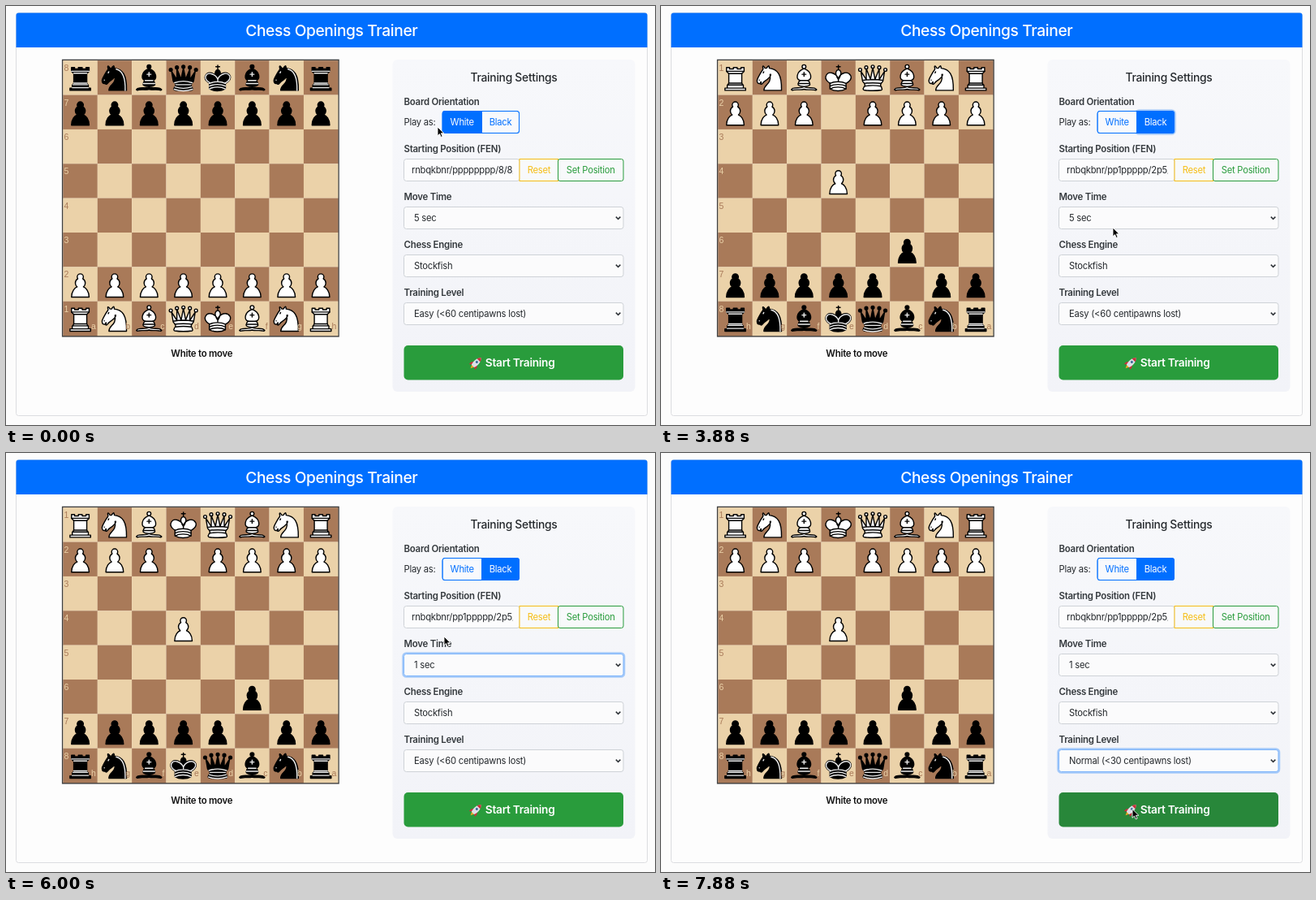
An HTML page for the animation above (8000 ms loop, 800 by 516 pixels).

```html
<!DOCTYPE html>
<html lang="en">
<head>
<meta charset="utf-8">
<title>Chess Openings Trainer</title>
<style>
  html, body { margin: 0; width: 100%; height: 100%; overflow: hidden; background: #fcfcfc; }
  svg { display: block; width: 800px; height: 516px; }
  text { font-family: Inter, Roboto, sans-serif; font-size: 11.2px; letter-spacing: -.02em; white-space: pre; }
  .label { font-size: 11.4px; font-weight: 600; }
  .coord { font-family: "Liberation Sans", Arial, sans-serif; font-size: 10.5px; letter-spacing: 0; }
</style>
</head>
<body>
<svg viewBox="0 0 800 516">
  <defs>
    <linearGradient id="panel" x2="0" y2="1"><stop stop-color="#f7f8fb"/><stop offset="1" stop-color="#f2f3f8"/></linearGradient>
    <linearGradient id="menu" x2="0" y2="1"><stop stop-color="#4c4d4e"/><stop offset=".5" stop-color="#565656"/><stop offset="1" stop-color="#4b4b4b"/></linearGradient>
    <clipPath id="fenClip"><rect x="499" y="189" width="125.5" height="26"/></clipPath>
  </defs>
  <g id="stage"></g>
</svg>
<script>
const LOOP = 8000, STEP = 125;
const BLUE = '#006fff', GREEN = '#299c3c', YELLOW = '#f5bd14', INK = '#24282c';
const LIGHT = '#ebd2a9', DARK = '#a97a59';
const BOARD = { x: 70.4, y: 67.2, cell: 42.36 };

// Piece outlines on a 45 x 45 grid: body, detail lines, and details for the black set.
const PIECES = {
  p: { body: 'M22.5 9c-2.21 0-4 1.79-4 4 0 .89.29 1.71.78 2.38C17.33 16.5 16 18.59 16 21c0 2.03.94 3.84 2.41 5.03-3 1.06-7.41 5.55-7.41 13.47h23c0-7.92-4.41-12.41-7.41-13.47 1.47-1.19 2.41-3 2.41-5.03 0-2.41-1.33-4.5-3.28-5.62.49-.67.78-1.49.78-2.38 0-2.21-1.79-4-4-4z', lines: '' },
  r: { body: 'M9 39h27v-3H9zM12 36v-4h21v4zM11 14V9h4v2h5V9h5v2h5V9h4v5l-3 3v12.5l1.5 2.5h-20l1.5-2.5V17z',
       lines: 'M11 14h23M14 17h17M14 29.5h17', dark: 'M12 35.5h21M13 31.5h19M14 29.5h17M14 16.5h17M11 14h23' },
  n: { body: 'M22 10c10.5 1 16.5 8 16 29H15c0-9 10-6.5 8-21M24 18c.38 2.91-5.55 7.37-8 9-3 2-2.82 4.34-5 4-1.04-.94 1.41-3.04 0-3-1 0 .19 1.23-1 2-1 0-4 1-4-4 0-2 6-12 6-12s1.89-1.9 2-3.5c-.73-1-.5-2-.5-3 1-1 3 2.5 3 2.5h2s.78-2 2.5-3c1 0 1 3 1 3',
       lines: 'M9 25.4v.2M14.8 14.6l-.7 1.5', dark: 'M9 25.4v.2M14.8 14.6l-.7 1.5M24.5 11.2c8 1.8 12.3 9.8 11.8 28' },
  b: { body: 'M9 36c3.39-.97 10.11.43 13.5-2 3.39 2.43 10.11 1.03 13.5 2 0 0 1.65.54 3 2-.68.97-1.65.99-3 .5-3.39-.97-10.11.46-13.5-1-3.39 1.46-10.11.03-13.5 1-1.35.49-2.32.47-3-.5 1.35-1.94 3-2 3-2zM15 32c2.5 2.5 12.5 2.5 15 0 .5-1.5 0-2 0-2 0-2.5-2.5-4-2.5-4 5.5-1.5 6-11.5-5-15.5-11 4-10.5 14-5 15.5 0 0-2.5 1.5-2.5 4 0 0-.5.5 0 2zM25 8a2.5 2.5 0 1 1-5 0 2.5 2.5 0 1 1 5 0z',
       lines: 'M17.5 26h10M15 30h15m-7.5-14.5v5M20 18h5' },
  q: { body: [[6, 12], [14, 9], [22.5, 8], [31, 9], [39, 12]].map(([x, y]) => `M${x - 2} ${y}a2 2 0 1 1 4 0a2 2 0 1 1-4 0z`).join('') +
         'M9 26c8.5-1.5 21-1.5 27 0l2-12-7 11V11l-5.5 13.5-3-15-3 15-5.5-14V25L7 14zM9 26c0 2 1.5 2 2.5 4 1 1.5 1 1 .5 3.5-1.5 1-1.5 2.5-1.5 2.5-1.5 1.5.5 2.5.5 2.5 6.5 1 16.5 1 23 0 0 0 1.5-1 0-2.5 0 0 .5-1.5-1-2.5-.5-2.5-.5-2 .5-3.5 1-2 2.5-2 2.5-4-8.5-1.5-18.5-1.5-27 0z',
       lines: 'M11.5 30c3.5-1 18.5-1 22 0M12 33.5c6-1 15-1 21 0',
       dark: 'M11 29a35 35 0 0 1 23 0M12.5 31.5h20M11.5 34.5a35 35 0 0 0 22 0M10.5 37.5a35 35 0 0 0 24 0' },
  k: { body: 'M22.5 11.63V6M20 8h5M22.5 25s4.5-7.5 3-10.5c0 0-1-2.5-3-2.5s-3 2.5-3 2.5c-1.5 3 3 10.5 3 10.5M11.5 37c5.5 3.5 15.5 3.5 21 0v-7s9-4.5 6-10.5c-4-6.5-13.5-3.5-16 4V27v-3.5c-3.5-7.5-13-10.5-16-4-3 6 5 10 5 10z',
       lines: 'M11.5 30c5.5-3 15.5-3 21 0M11.5 33.5c5.5-3 15.5-3 21 0M11.5 37c5.5-3 15.5-3 21 0',
       dark: 'M32 29.5s8.5-4 6-9.65C34.15 14 25 18 22.5 24.5v2.1-2.1C20 18 9.9 14 7 19.85c-2.5 5.65 4.85 9 4.85 9M11.5 30c5.5-3 15.5-3 21 0M11.5 33.5c5.5-3 15.5-3 21 0M11.5 37c5.5-3 15.5-3 21 0' },
};

// Pointer stops: time, x, y
const POINTER = [
  [0, 532, 149], [375, 606, 146], [500, 606, 146], [1000, 239, 288], [1500, 218, 133], [1625, 218, 133],
  [2250, 230.5, 197.5], [2375, 222, 211], [2875, 303, 344], [3000, 303, 344], [3250, 303, 304],
  [3875, 557, 273], [4250, 548, 263], [4875, 546, 262], [5375, 543, 237.5], [5750, 540, 226],
  [6000, 540, 226], [6500, 559.5, 332], [6750, 562, 379], [6875, 562, 379], [7250, 566, 398],
  [7375, 566, 398], [7875, 581, 438.5], [8000, 581, 439],
];
const FLIP = 500, TIME_MENU = [4375, 6000], LEVEL_MENU = [6875, 7375];
const MOVES = [
  { from: 'e2', to: 'e4', lift: 1625, drop: 2375 },
  { from: 'c7', to: 'c6', lift: 3000, drop: 3250 },
];
const TIMES = ['Instant response', '1 sec', '3 sec', '5 sec', '10 sec', '15 sec', '30 sec', '1 minute'];
const LEVELS = ['Easy (&lt;60 centipawns lost)', 'Normal (&lt;30 centipawns lost)', 'Hard (&lt;10 centipawns lost)'];

const during = (t, [a, b]) => t >= a && t < b;

function pointerAt(t) {
  const i = Math.max(1, POINTER.findIndex(p => p[0] > t));
  const [t0, x0, y0] = POINTER[i - 1], [t1, x1, y1] = POINTER[i];
  const u = (t - t0) / (t1 - t0), e = u * u * (3 - 2 * u);
  return { x: x0 + (x1 - x0) * e, y: y0 + (y1 - y0) * e };
}

const rect = (x, y, w, h, fill, extra = '') => `<rect x="${x}" y="${y}" width="${w}" height="${h}" fill="${fill}" ${extra}/>`;
// Text is placed by the middle of its line.
const text = (x, y, s, fill = INK, extra = '') => `<text x="${x}" y="${y + 4}" fill="${fill}" ${extra}>${s}</text>`;
const centred = (x, y, s, fill, extra = '') => text(x, y, s, fill, `text-anchor="middle" ${extra}`);
const label = (y, s) => text(490.5, y, s, '#33383c', 'class="label"');

function piece(code, x, y) {
  const white = code < 'a', { body, lines, dark = lines } = PIECES[code.toLowerCase()];
  return `<g transform="translate(${x} ${y}) scale(${BOARD.cell / 45})" stroke-width="1.5" stroke-linecap="round" stroke-linejoin="round">
    <path d="${body}" fill="${white ? '#fff' : '#000'}" stroke="#000"/>
    <path d="${white ? lines : dark}" fill="none" stroke="${white ? '#000' : '#ececec'}"/></g>`;
}

function startPosition() {
  const squares = {};
  [...'rnbqkbnr'].forEach((c, i) => {
    const file = 'abcdefgh'[i];
    Object.assign(squares, { [file + 8]: c, [file + 7]: 'p', [file + 2]: 'P', [file + 1]: c.toUpperCase() });
  });
  return squares;
}

function board(t, mouse) {
  const { x: bx, y: by, cell } = BOARD, flipped = t >= FLIP;
  const name = (c, r) => 'abcdefgh'[flipped ? 7 - c : c] + (flipped ? r + 1 : 8 - r);
  const squares = startPosition();
  MOVES.filter(m => t >= m.drop).forEach(m => {
    squares[m.to] = squares[m.from];
    delete squares[m.from];
  });
  const drag = MOVES.find(m => during(t, [m.lift, m.drop]));
  const over = name(Math.floor((mouse.x - bx) / cell), Math.floor((mouse.y - by) / cell));
  let cells = '', marks = '', men = '', notes = '';
  for (let r = 0; r < 8; r++) for (let c = 0; c < 8; c++) {
    const x = bx + c * cell, y = by + r * cell, sq = name(c, r), odd = (r + c) % 2;
    const ink = odd ? LIGHT : DARK;
    cells += rect(x, y, cell + .1, cell + .1, odd ? DARK : LIGHT);
    if (drag && (sq === drag.from || sq === over))
      marks += rect(x + 1.4, y + 1.4, cell - 2.8, cell - 2.8, 'none', 'stroke="#fbe82c" stroke-width="2.8"');
    if (squares[sq] && !(drag && sq === drag.from)) men += piece(squares[sq], x, y);
    if (c === 0) notes += text(x + 1.2, y + 9, sq[1], ink, 'class="coord"');
    if (r === 7) notes += text(x + cell - 2, y + 30.5, sq[0], ink, 'class="coord" text-anchor="end"');
  }
  const held = drag ? piece(squares[drag.from], mouse.x - cell / 2, mouse.y - cell / 2) : '';
  const turn = during(t, [MOVES[0].drop, MOVES[1].drop]) ? 'Black' : 'White';
  return rect(bx - .7, by - .7, cell * 8 + 1.4, cell * 8 + 1.4, 'none', 'stroke="#404040" stroke-width="1.6"') +
    cells + marks + men + notes + centred(241.3, 427.5, turn + ' to move', '#111', 'class="label"') + held;
}

const ring = (x, y, w, h) => rect(x - 1, y - 1, w + 2, h + 2, 'none', 'rx="4" stroke="#8dbcfa" stroke-opacity=".75" stroke-width="2.6"');

function select(y, value, focused) {
  return (focused ? ring(490.5, y - 13.5, 270.5, 27) : '') +
    rect(490.5, y - 13.5, 270.5, 27, '#fbfbfc', `rx="3" stroke="${focused ? '#7db4fb' : '#ced2d7'}"`) +
    text(503, y, value) +
    `<path d="M751.8 ${y - 1.4}l2.8 2.8 2.8-2.8" fill="none" stroke="#30343a" stroke-width="1.5"/>`;
}

function menu(y, options, chosen, mouse) {
  const pitch = 18.68, top = y - chosen * pitch - 14;
  const hover = Math.floor((mouse.y - top - 4.7) / pitch);
  let out = rect(484.5, top, 272, options.length * pitch + 8.6, 'url(#menu)', 'rx="5" stroke="#333" stroke-width=".8" style="filter:drop-shadow(0 2px 3px #0004)"');
  options.forEach((s, i) => {
    const cy = top + 14 + i * pitch;
    if (i === hover) out += rect(488, cy - 9.3, 265, 18.6, '#477ce6', 'rx="3"');
    if (i === chosen) out += `<path d="M492 ${cy + .5}l2 2.6 3.8-6" fill="none" stroke="#f2f2f2" stroke-width="1.3"/>`;
    out += text(501.3, cy, s, '#f2f2f2', 'style="font-size:11.4px"');
  });
  return out;
}

const rocket = `<g transform="translate(579.3 439.5) rotate(45)">
  <path d="M-2 5L0 9.5 2 5z" fill="#f6a623"/>
  <path d="M-2.5 0L-5 3.5V7l3-2h4l3 2V3.5L2.5 0z" fill="#c9303c"/>
  <path d="M0-9C4-5 4 1 2.2 5.5h-4.4C-4 1-4-5 0-9z" fill="#dbe1e8"/>
  <path d="M0-9C1.6-7.4 2.4-6 2.8-4.5h-5.6C-2.4-6-1.6-7.4 0-9z" fill="#c9303c"/>
  <circle cy="-1.5" r="1.5" fill="#3c6b96"/></g>`;

function settings(t, mouse) {
  const black = t >= FLIP, fenMoved = t >= MOVES[1].drop;
  const fen = fenMoved ? 'rnbqkbnr/pp1ppppp/2p5/8/4P3/8' : 'rnbqkbnr/pppppppp/8/8/8/8';
  const hot = mouse.y > 418 && mouse.x > 491;
  const choice = (x, w, s, on) => rect(x, 129.5, w, 27, on ? BLUE : '#f8f9fc', `stroke="${BLUE}"`) +
    centred(x + w / 2, 143, s, on ? '#fff' : BLUE);
  return rect(476.5, 66, 299, 409, 'url(#panel)', 'rx="6"') +
    centred(626, 88.8, 'Training Settings', INK, 'style="font-size:13.85px;font-weight:500"') +
    label(117.5, 'Board Orientation') + text(490.5, 143, 'Play as:') +
    (black && t < TIME_MENU[0] ? ring(586, 129.5, 46.5, 27) : '') +
    `<clipPath id="pair">${rect(537.5, 129, 95.5, 28, '#000', 'rx="3.5"')}</clipPath><g clip-path="url(#pair)">` +
    choice(538, 48.5, 'White', !black) + choice(586.5, 46, 'Black', black) + '</g>' +
    rect(538, 129.5, 94.5, 27, 'none', `rx="3" stroke="${BLUE}"`) +
    label(176.3, 'Starting Position (FEN)') +
    rect(490.5, 188.5, 142.5, 27, '#fcfcfd', 'rx="3" stroke="#ced2d7"') +
    `<g clip-path="url(#fenClip)">${text(500, 202, fen)}</g>` +
    rect(633, 188.5, 47.5, 27, '#f8f9fb', `stroke="${YELLOW}"`) + centred(657, 202, 'Reset', YELLOW) +
    rect(680.5, 188.5, 80.5, 27, '#f8f9fb', `rx="2.5" stroke="${GREEN}"`) + centred(720.7, 202, 'Set Position', GREEN) +
    label(235.3, 'Move Time') + select(261, t < TIME_MENU[1] ? '5 sec' : '1 sec', during(t, [TIME_MENU[0], LEVEL_MENU[0]])) +
    label(294.2, 'Chess Engine') + select(320, 'Stockfish', false) +
    label(353, 'Training Level') + select(379, LEVELS[t < LEVEL_MENU[1] ? 0 : 1], t >= LEVEL_MENU[0]) +
    rect(490.5, 418, 270.5, 42.5, hot ? '#28873a' : GREEN, 'rx="5"') + rocket +
    text(590.8, 439.8, 'Start Training', '#fff', 'style="font-size:13.7px;font-weight:600"');
}

function scene(t) {
  const mouse = pointerAt(t);
  return rect(12.5, 8.5, 778, 496, '#fdfdfd', 'rx="3" stroke="#dcdde0"') +
    `<path d="M12.5 51V11.5q0-3 3-3H787.500q3 0 3 3V51z" fill="${BLUE}"/>` +
    centred(401.3, 32.8, 'Chess Openings Trainer', '#fff', 'style="font-size:19.2px;font-weight:500"') +
    settings(t, mouse) + board(t, mouse) +
    (during(t, TIME_MENU) ? menu(262, TIMES, 3, mouse) : '') +
    (during(t, LEVEL_MENU) ? menu(380, LEVELS, 0, mouse) : '') +
    `<path transform="translate(${mouse.x} ${mouse.y})" d="M0 0v10.800l2.500-2.300 1.700 3.900 1.900-.8-1.700-3.800h3.500z" fill="#000" stroke="#fff" stroke-width=".9"/>`;
}

const stage = document.getElementById('stage');
const begin = performance.now();
let shown = -1;
function draw() {
  const t = Math.floor((performance.now() - begin) % LOOP / STEP) * STEP;
  if (t !== shown) stage.innerHTML = scene(shown = t);
  requestAnimationFrame(draw);
}
draw();
</script>
</body>
</html>
```
